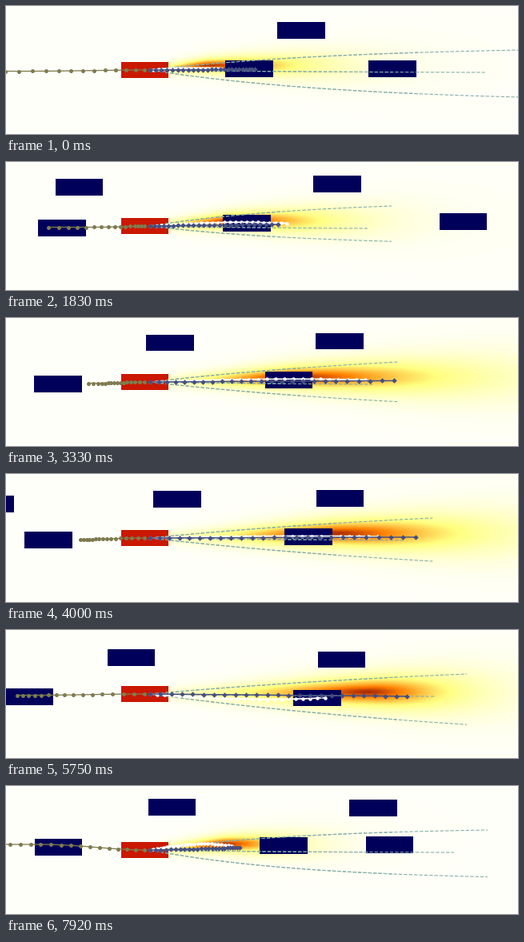
A matplotlib script that plays this animation: 640x160 px, repeating every 8 s.

```python
import numpy as np
import matplotlib.pyplot as plt
from matplotlib.animation import FuncAnimation
from matplotlib.patches import Rectangle

W, H, DPI = 640, 160, 100
FRAMES, INTERVAL = 200, 40
TICK = 8 / 96  # simulation step in seconds
PX = 72 / DPI

NAVY, RED = "#00005a", "#cb1800"
OLIVE, SLATE, TEAL = "#7f7b50", "#454f80", "#86aeab"
CAR_W, CAR_H = 59.5, 20.5
EGO_X, EGO_Y, NOSE = 173, 80, 180

# Key points over time: (seconds, value)
SPEED = [(-2.3, 19.5), (0, 11), (1.1, 6), (1.9, 3.6), (2.6, 4.4), (4, 8.5),
         (5.4, 13.2), (7.9, 10.8)]
PLAN_END = [(0, 311), (1.08, 306), (4, 512), (5.75, 501), (7.08, 445), (7.92, 291)]
TRUE_END = [(0, 268), (1.1, 308), (4, 465), (7.1, 320), (7.92, 282)]
REACH = [(0, 645), (1.1, 523), (2.6, 462), (4.5, 555), (7.92, 602)]
HOT_SPOT = [(0, 252), (2.3, 292), (5.2, 468), (7.92, 272)]
DRIFT = [(0, 0), (1.8, -.6), (4, 0), (5.7, 3.5), (7.08, -.3), (7.92, -5)]
YAW = [(0, 0), (1.8, -.008), (4, 0), (5.7, .014), (7.08, 0), (7.92, .007)]

# Other cars: lane height and left edge over time
LEAD = [(0, 274), (1.08, 262), (2.58, 290.5), (4, 348), (5.5, 360), (7.08, 343),
        (7.92, 317)]
TRAFFIC = [
    (68, LEAD),
    (20, [(0, 339), (1.08, 380), (2.58, 386.5), (5.75, 389.5), (7.08, 402),
          (7.92, 429.5)]),
    (72, [(0, -75), (1.08, 38.5), (2.58, 41), (5.75, -1), (7.92, 36)]),
    (21, [(1.1, -62), (2.58, 150), (4, 184), (5.75, 126.5), (7.92, 178)]),
    (68, [(0, 453), (1.08, 452), (2.4, 645)]),
    (66, [(7.4, 535), (7.92, 449)]),
    (27, [(3.4, -60), (4, -49.5), (4.5, -62)]),
]


def glide(t, knots):
    """Monotone cubic through the key points."""
    x, y = np.array(knots, float).T
    h = np.diff(x)
    d = np.diff(y) / h
    m = np.concatenate([d[:1], np.zeros(len(x) - 2), d[-1:]])
    prod = d[:-1] * d[1:]
    same = prod > 0
    m[1:-1][same] = 2 * prod[same] / (d[:-1] + d[1:])[same]
    i = np.clip(np.searchsorted(x, t, "right") - 1, 0, len(h) - 1)
    u = np.clip((t - x[i]) / h[i], 0, 1)
    return ((1 + 2 * u) * (1 - u) ** 2 * y[i] + u * (1 - u) ** 2 * h[i] * m[i]
            + u * u * (3 - 2 * u) * y[i + 1] + u * u * (u - 1) * h[i] * m[i + 1])


def ease(u):
    u = np.clip(u, 0, 1)
    return u * u * (3 - 2 * u)


def path(start, gaps):
    return start + np.concatenate([[0], np.cumsum(gaps)])


def car_spot(t, lane, track):
    x = glide(t, track)
    return x, lane + glide(t, DRIFT) + glide(t, YAW) * (x + CAR_W / 2 - EGO_X)


def lead_offset(t):
    return car_spot(t, 68, LEAD)[1] + CAR_H / 2 - EGO_Y


def plan_gap(t):
    return (glide(t, PLAN_END) - NOSE) / 24


def past_path(t):
    # each older dot is spaced by the speed at that time
    k = np.arange(16)
    gaps = glide(t - .155 * (k[:-1] + .5), SPEED)
    far = 1.5 - 8.5 * ease((t - 6) / 1.9)
    return path(EGO_X, -gaps), EGO_Y + far * ease(k / 11)


def plan_path(t):
    mean = plan_gap(t)
    first = (glide(t, SPEED) + 2 * mean) / 3
    gaps = np.linspace(first, 2 * mean - first, 24)
    return path(NOSE, gaps), EGO_Y + .6 * lead_offset(t) * np.linspace(0, 1, 25)


def true_path(t):
    u = np.linspace(0, 1, 25)
    x = NOSE + (glide(t, TRUE_END) - NOSE) * u
    return x, EGO_Y + 1.4 * lead_offset(t) * np.sin(.75 * np.pi * u)


def guess_paths(t):
    """A long and a short forecast for left, straight and right."""
    speed, bend = glide(t, SPEED), plan_gap(t) / 10
    length = glide(t, REACH) - NOSE
    short = .45 + .025 * speed
    for side, scale in ((-25, 1), (3, .9), (12 + 2 * speed, 1)):
        for part in (1, short):
            u = np.linspace(0, part, 60)
            rise = (1 - np.exp(-u / bend)) / (1 - np.exp(-1 / bend))
            yield NOSE + length * scale * u, EGO_Y + side * rise


X, Y = np.meshgrid(np.arange(1, W, 2), np.arange(1, H, 2))


def heat_map(t):
    cx, tip = glide(t, HOT_SPOT), glide(t, PLAN_END)
    ahead = np.clip(X - NOSE, 0, None)
    reach = np.clip(ahead / (cx - NOSE), 0, 1)
    mid = EGO_Y + (.5 * lead_offset(t) - 5) * reach
    width = np.where(X < cx, .5 * (cx - NOSE) + 15, tip - cx + 50)
    spread = 4 + .044 * ahead
    r = np.hypot((X - cx) / width, (Y - mid) / spread)
    return .015 + .66 * np.clip(ahead / 30, 0, 1) * np.exp(-r ** 1.3)


fig = plt.figure(figsize=(W / DPI, H / DPI), dpi=DPI)
ax = fig.add_axes([0, 0, 1, 1])
ax.set_axis_off()
heat = ax.imshow(heat_map(0), cmap="afmhot_r", vmin=0, vmax=1,
                 extent=(0, W, H, 0), aspect="auto", interpolation="bilinear")
ax.set_xlim(0, W)
ax.set_ylim(H, 0)


def add_car(color, xy=(-100, 0)):
    return ax.add_patch(Rectangle(xy, CAR_W, CAR_H, color=color, lw=0, zorder=2))


def add_line(color, width, z, **style):
    return ax.plot([], [], color=color, lw=width * PX, zorder=z, **style)[0]


add_car(RED, (143.5, 69.7))
cars = [add_car(NAVY) for _ in TRAFFIC]
past = add_line(OLIVE, 1.3, 3, marker="o", ms=5 * PX, mew=0)
guesses = [add_line(TEAL, 1.1, 4, dashes=(4, 1.8)) for _ in range(6)]
true = add_line("white", 1.8, 5, marker="o", ms=4.5 * PX, mew=0)
plan = add_line(SLATE, 1.5, 6, marker="D", ms=4.6 * PX, mew=0)


def draw(i):
    t = round(i * INTERVAL / 1000 / TICK) * TICK
    heat.set_data(heat_map(t))
    for car, (lane, track) in zip(cars, TRAFFIC):
        car.set_visible(track[0][0] <= t <= track[-1][0] + TICK)
        car.set_xy(car_spot(t, lane, track))
    past.set_data(*past_path(t))
    plan.set_data(*plan_path(t))
    true.set_data(*true_path(t))
    for line, points in zip(guesses, guess_paths(t)):
        line.set_data(*points)
    return [heat, *cars, past, plan, true, *guesses]


anim = FuncAnimation(fig, draw, frames=FRAMES, interval=INTERVAL,
                     repeat=True, repeat_delay=0, blit=False)
plt.show()
```
